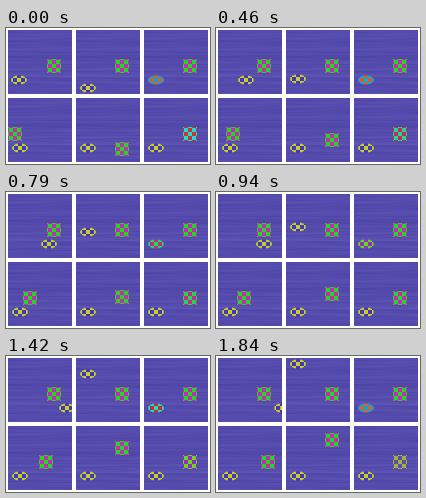
These frames come from a looping animation (204 px wide and 136 px high, 1.87 s). An HTML page with a canvas:

```html
<!DOCTYPE html>
<html lang="en">
<head>
<meta charset="utf-8">
<title>Six latent sweeps</title>
<style>
html, body { margin: 0; width: 100%; height: 100%; overflow: hidden; background: #fff; }
canvas { display: block; width: 204px; height: 136px; }
</style>
</head>
<body>
<canvas id="stage" width="204" height="136"></canvas>
<script>
const ctx = document.getElementById('stage').getContext('2d');
const LOOP = 1870, HOLD = 100, STEP = 30, LAST = 59;
const SIZE = 64, PITCH = 68, CELL = 4;

const mix = (a, b, u) => a + (b - a) * u;
const smooth = t => t * t * (3 - 2 * t);
const easeOut = t => mix(t, Math.sin(t * Math.PI / 2), 0.85);

// Each panel sweeps one property of the scene; t runs from 0 to 1.
const sweeps = [
  (t, oval) => { oval.x = mix(11, 63.5, easeOut(t)); },
  (t, oval) => { oval.y = mix(58, 6, (t + smooth(t)) / 2); },
  (t, oval) => { oval.hue = 200 - 115 * Math.exp(-(((t - 0.55) / 0.17) ** 2)); },
  (t, oval, box) => { box.x = mix(7, 50, t ** 1.15); },
  (t, oval, box) => { box.y = mix(50.5, 13.5, t); },
  (t, oval, box) => { box.hue = mix(180, 68, t); box.sat = 1 - 0.45 * t ** 8; }
];

function makeTexture() {
  const tile = document.createElement('canvas');
  tile.width = tile.height = SIZE;
  const g = tile.getContext('2d');
  let seed = 17, row = 0;
  const random = () => (seed = (seed * 16807) % 2147483647) / 2147483647;
  for (let y = 0; y < SIZE; y++) {
    row = row * 0.5 + random() * 8 - 4;
    const phase = random() * 6.28;
    for (let x = 0; x < SIZE; x++) {
      const v = row + 2.5 * Math.sin(x / 14 + phase);
      g.fillStyle = `rgb(${85 + v},${76 + v},${173 + v * 0.8})`;
      g.fillRect(x, y, 1, 1);
    }
  }
  return tile;
}
const texture = makeTexture();

// Checks in one hue and its complement, clipped to the current path.
function checker({ x, y, hue, sat = 1 }, outline) {
  ctx.save();
  ctx.translate(Math.round(x), Math.round(y));
  ctx.beginPath();
  outline();
  ctx.clip();
  for (let r = -2; r <= 2; r++) {
    for (let c = -2; c <= 2; c++) {
      const even = (r + c) % 2 === 0;
      ctx.fillStyle = even
        ? `hsl(${hue}, ${78 * sat}%, 48%)`
        : `hsl(${hue + 185}, ${64 * sat}%, 47%)`;
      ctx.fillRect((c - 0.5) * CELL, (r - 0.5) * CELL, CELL, CELL);
    }
  }
  ctx.restore();
}

function panel(index, t) {
  const oval = { x: 11.5, y: 50, hue: 72 };
  const box = { x: 46, y: 35.5, hue: 122 };
  sweeps[index](t, oval, box);

  ctx.save();
  ctx.translate(2 + index % 3 * PITCH, 2 + Math.floor(index / 3) * PITCH);
  ctx.beginPath();
  ctx.rect(0, 0, SIZE, SIZE);
  ctx.clip();
  ctx.drawImage(texture, 0, 0);
  checker(box, () => ctx.rect(-7, -7, 14, 14));
  checker(oval, () => ctx.ellipse(0, 0, 8, 4.6, 0, 0, Math.PI * 2));
  ctx.restore();
}

function draw() {
  const time = performance.now() % LOOP;
  const step = time < HOLD ? 0 : Math.floor((time - HOLD) / STEP) + 1;
  const t = Math.min(step / LAST, 1);
  ctx.fillStyle = '#fff';
  ctx.fillRect(0, 0, 204, 136);
  sweeps.forEach((_, i) => panel(i, t));
  requestAnimationFrame(draw);
}
draw();
</script>
</body>
</html>
```
